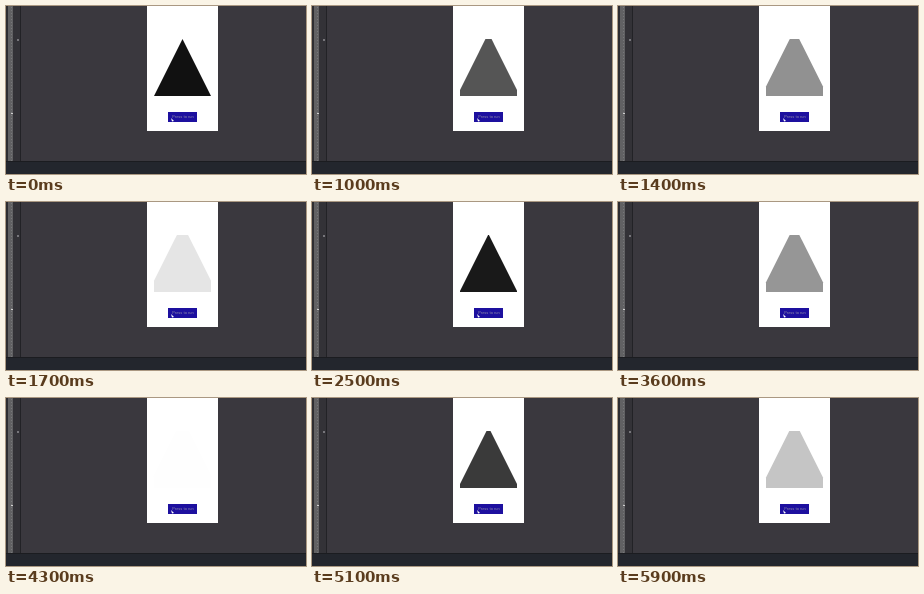
Recreate the animation shown at these times as an HTML page with a canvas. Size 300 px wide and 168 px high, loop 6000 ms.

```html
<!DOCTYPE html>
<html lang="en">
<head>
<meta charset="utf-8">
<style>
html, body { margin: 0; width: 100%; height: 100%; overflow: hidden; background: #3a383e; }
canvas { display: block; width: 100vw; height: 100vh; }
</style>
</head>
<body>
<canvas id="stage" width="300" height="168"></canvas>
<script>
const ctx = document.getElementById('stage').getContext('2d');
const LOOP = 6000, STEP = 100, CYCLE = 20.65;

// [step within a cycle, gray level]
const SHADES = [[0, 17], [3.35, 25], [7.7, 58], [10, 85], [14.35, 150],
  [15.7, 197], [17, 229], [19, 249], [CYCLE, 255]];

function rect(color, x, y, w, h) {
  ctx.fillStyle = color;
  ctx.fillRect(x, y, w, h);
}

function polygon(color, points) {
  ctx.fillStyle = color;
  ctx.beginPath();
  points.forEach(([x, y]) => ctx.lineTo(x, y));
  ctx.closePath();
  ctx.fill();
}

function shadeAt(phase) {
  const i = Math.max(1, SHADES.findIndex(([at]) => at >= phase));
  const [a, from] = SHADES[i - 1], [b, to] = SHADES[i];
  return Math.round(from + (to - from) * (phase - a) / (b - a));
}

function drawEditor() {
  rect('#3a383e', 0, 0, 300, 168);
  rect('#2d2d31', 0, 0, 2, 155);
  rect('#616163', 2, 0, 5, 155);
  for (let y = 1; y < 155; y += 3) rect('#77777a', 5, y, 1, 1);
  rect('#333237', 7, 0, 7, 155);
  rect('#222226', 14, 0, 1, 155);
  rect('#77767b', 11, 33, 2, 2);
  rect('#d0d0d0', 5, 107, 2, 1);
  rect('#1b1c20', 0, 155, 300, 1);
  rect('#23262d', 0, 156, 300, 12);
  rect('#fff', 141, 0, 71, 125);
}

function drawButton() {
  rect('#1d109f', 162, 106, 29, 10);
  ctx.fillStyle = '#8f8aa8';
  ctx.font = '4px Roboto, sans-serif';
  ctx.textAlign = 'center';
  ctx.textBaseline = 'middle';
  ctx.fillText('Press to run', 177, 111);
  polygon('#fff', [[165, 112], [168, 115], [166, 115.5]]);
}

function drawShape(phase) {
  const p = Math.min(1, phase / 19.5);
  const cut = 11.7 * p * p * (3 - 2 * p);
  const shade = shadeAt(phase);
  polygon(`rgb(${shade},${shade},${shade})`, [
    [176.5 - cut / 2, 33], [176.5 + cut / 2, 33],
    [205, 90 - cut], [205, 90], [148, 90], [148, 90 - cut]
  ]);
}

function draw(now) {
  const tick = Math.floor((now % LOOP) / STEP);
  // The picture holds for one extra step at 2100 and 4200 ms.
  const step = tick - Math.floor(tick / 21);
  drawEditor();
  drawShape(step % CYCLE);
  drawButton();
}

const start = performance.now();
function frame() {
  draw(performance.now() - start);
  requestAnimationFrame(frame);
}
frame();
</script>
</body>
</html>
```
